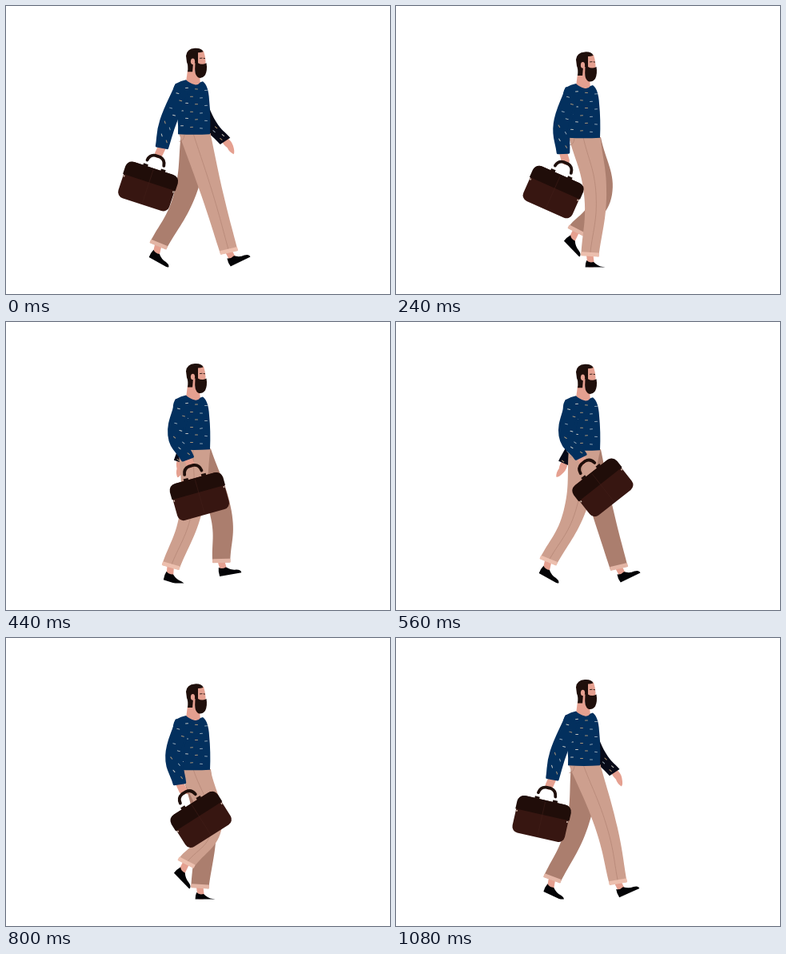
Animation, 480 px wide and 360 px high, one loop 1120 ms. Source, as an HTML page:

```html
<!DOCTYPE html>
<html lang="en">
<head>
<meta charset="utf-8">
<title>Walking man</title>
<style>
html, body { margin: 0; width: 100%; height: 100%; overflow: hidden; background: #fff; }
svg { display: block; width: 480px; height: 360px; }
</style>
</head>
<body>
<svg id="stage" viewBox="0 0 480 360"></svg>
<script>
const LOOP = 1120, HALF = LOOP / 2, STEP = 40, LAG = 120;
const SKIN = '#e5a090', NAVY = '#03305e', HAIR = '#1f0f0b', BLACK = '#030306', SEAM = '#b58776';
const { PI, sin, cos, atan2 } = Math;
const stage = document.getElementById('stage');

function el(parent, tag, attrs = {}) {
  const node = document.createElementNS('http://www.w3.org/2000/svg', tag);
  set(node, attrs);
  return parent.appendChild(node);
}
function set(node, attrs) {
  for (const key in attrs) node.setAttribute(key, attrs[key]);
}
const shape = (parent, d, fill) => el(parent, 'path', { d, fill });
const line = (parent, stroke, width, d = '') =>
  el(parent, 'path', { d, fill: 'none', stroke, 'stroke-width': width, 'stroke-linecap': 'round' });
const place = (node, p, angle = 0) =>
  set(node, { transform: `translate(${xy(p)}) rotate(${angle.toFixed(2)})` });
const xy = p => p[0].toFixed(2) + ',' + p[1].toFixed(2);
const mix = (a, b, k) => a + (b - a) * k;
const lerp = (a, b, k) => [mix(a[0], b[0], k), mix(a[1], b[1], k)];
const deg = a => a * 180 / PI;
const wave = (time, turns = 1) => cos(2 * PI * turns * time / LOOP);

// Limbs are two smooth edges running from the top over the joint to the end.
const endTilt = (mid, end) => 0.8 * atan2(mid[0] - end[0], end[1] - mid[1]);

function curve(top, mid, end) {
  const dx = (end[0] - top[0]) * 0.22, dy = (end[1] - top[1]) * 0.22;
  return [lerp(top, mid, 0.4), [mid[0] - dx, mid[1] - dy], mid,
    [mid[0] + dx, mid[1] + dy], lerp(end, mid, 0.4), end];
}
function limb(left, right, mid, midHalf, end, endHalf) {
  const a = endTilt(mid, end), c = cos(a) * endHalf, s = sin(a) * endHalf;
  const back = curve(left, [mid[0] - midHalf, mid[1]], [end[0] - c, end[1] - s]);
  const front = curve(right, [mid[0] + midHalf, mid[1]], [end[0] + c, end[1] + s]).reverse();
  return `M${xy(left)} C${back.map(xy).join(' ')} L${xy(front[0])} C`
    + [...front.slice(1), right].map(xy).join(' ') + 'Z';
}

function makeDashes(parent, count) {
  const tints = ['#e6e2d6', '#c9a77b', '#a9b8c4'];
  return Array.from({ length: count }, (_, i) => el(parent, 'rect',
    { x: -2, y: -0.5, width: 4, height: 1, rx: 0.5, opacity: 0.85, fill: tints[i % 3] }));
}

// The foot slides back over the ground in the first half of the cycle, then swings forward.
function gait(time) {
  const t = time % LOOP, u = t % HALF / HALF;
  if (t < HALF) return {
    x: mix(279, 190, u - 0.04 * sin(2 * PI * u)),
    y: mix(308, 300, u) + 8 * sin(PI * u),
    bend: 11 * (1 - (1 - u) ** 4),
    angle: 29 * u * u - 26 * (1 - u) ** 8
  };
  const ease = (1 - cos(PI * u)) / 2, lift = sin(PI * u ** 0.8) ** 2;
  return {
    x: mix(190, 279, ease),
    y: mix(300, 308, u) - 21 * lift,
    bend: 11 * (1 - u) + 20 * sin(PI * u),
    angle: mix(29, -26, ease) + 38 * lift
  };
}

const ground = el(stage, 'clipPath', { id: 'ground' });
el(ground, 'rect', { width: 480, height: 326.6 });

function makeLeg(color, cuffColor, seamColor) {
  const g = el(stage, 'g', { 'clip-path': 'url(#ground)' });
  const ankle = line(g, SKIN, 8.5);
  const shoe = shape(g, 'M0,-1 Q4,2 9,0 Q15,5 21,5 Q27.5,6 27,10 L-0.5,10 Q-1.5,4 0,-1Z', BLACK);
  const cloth = shape(g, '', color);
  const seam = line(g, seamColor, 0.8);
  const cuff = el(g, 'rect', { x: -11.3, y: -4.5, width: 22.6, height: 5, rx: 1, fill: cuffColor });
  return (time, bob, left, right) => {
    const { x, y, bend, angle } = gait(time);
    const top = 159 + bob, hip = [234, top], end = [x, y];
    const knee = [mix(236, x, 0.51) + bend, 236];
    const heel = [x - 4 - 0.07 * angle, y + 7 - 0.05 * angle];
    const r = angle * PI / 180;
    const instep = [heel[0] + 6 * cos(r) - 4 * sin(r), heel[1] + 6 * sin(r) + 4 * cos(r)];
    set(cloth, { d: limb([left, top], [right, top], knee, 14, end, 11) });
    set(seam, { d: `M${xy(hip)} C${curve(hip, [knee[0] + 1, 236], end).map(xy).join(' ')}` });
    set(ankle, { d: `M${xy(end)} L${xy(instep)}` });
    place(cuff, end, deg(endTilt(knee, end)));
    place(shoe, heel, angle);
  };
}

// Far arm
const farHand = shape(stage, 'M-2,-4 Q5,-6 11,-3 Q19,1 19,4 Q13,6 8,4 Q1,5 -2,3Z', SKIN);
const farSleeve = el(stage, 'path', { fill: '#080a18' });
const farDashes = makeDashes(stage, 5);

const farLeg = makeLeg('#ab7e6e', '#e3b5a5', 'none');
const nearLeg = makeLeg('#cd9f8e', '#ecbfae', SEAM);

// Torso and head
const body = el(stage, 'g');
line(body, SEAM, 0.8, 'M217,169 Q222,169 223,161');
shape(body, 'M227,80 L242,84 L243,99 L234,102 L225,95Z', SKIN);
shape(body, 'M225,92 Q219,93 212,97 Q206,104 211,125 Q216,140 215,159.8 Q235,161 255,159.8'
  + ' Q256,137 254,117 Q253,99 246,94 L243,95 Q240,99 236,98 Q229,96 225,92Z', NAVY);
makeDashes(body, 18).forEach((dash, i) => {
  const row = Math.floor(i / 3), col = i % 3;
  place(dash, [224 + col * 12 + (row % 2 ? -4 : 2), 102 + row * 9.5 + col * 1.5], (i * 7) % 11 - 5);
});
shape(body, 'M236,56 L247,56 Q249,62 249.5,69 L249,76 L236,80Z', SKIN);
shape(body, 'M225,62 Q226,53 236,52.5 Q245,52 246.5,57 Q243,58 240,58 L240,71 Q245,74 250.5,71'
  + ' Q252,80 249,86 Q245,91 240,89 Q236,86 236,78 L234,82 L227,82 Q228,74 226,70 Z', HAIR);
el(body, 'ellipse', { cx: 233.5, cy: 69, rx: 2.6, ry: 3.8, fill: SKIN });
shape(body, 'M234,71 L236.5,71 L236,83 L233,83Z', SKIN);
line(body, HAIR, 0.9, 'M242.5,65 L245,64.8 M247,65 L248.5,65.2');

// Near hand, bag and sleeve
const hand = line(stage, SKIN, 10);
const bag = el(stage, 'g');
line(bag, HAIR, 3.8, 'M-11,9 Q-10,1.5 -3,0.5 L3,0.5 Q10,1.5 11,9.5');
shape(bag, 'M-14,18 v-4 h6 v4Z M9,18 v-4 h6 v4Z', HAIR);
el(bag, 'rect', { x: -33.5, y: 16.5, width: 67, height: 47.5, rx: 8, fill: '#371611' });
shape(bag, 'M-34.5,35 V25 Q-33.5,16.5 -25,16.5 H25 Q33.5,16.5 34.5,25 V35Z', '#200d09');
line(bag, '#43201a', 0.5, 'M0,19 V62');
shape(bag, 'M-33,36 h1.5 v2 h-1.5Z M31.5,36 h1.5 v2 h-1.5Z', '#d9c3b5');
const sleeve = el(stage, 'path',
  { fill: NAVY, stroke: NAVY, 'stroke-width': 3, 'stroke-linejoin': 'round' });
const sleeveDashes = makeDashes(stage, 8);

function drawFarArm(time, bob) {
  const swing = wave(time);
  const root = [236, 110 + bob];
  const wrist = [242 + 32 * swing, 172.5 + bob - 4 * swing];
  const elbow = lerp(root, wrist, 0.5);
  elbow[0] -= 3 * swing;
  elbow[1] += 5;
  set(farSleeve, { d: limb([227, root[1]], [247, root[1]], elbow, 10.5, wrist, 7.5) });
  place(farHand, wrist, 77 - 40 * wave(time - LAG));
  farDashes.forEach((dash, i) => {
    const p = lerp(elbow, wrist, 0.1 + i * 0.2);
    place(dash, [p[0] + (i % 2 ? 4 : -3), p[1]], 40);
  });
}

function drawNearArm(time, bob) {
  const swing = wave(time), twice = wave(time, 2);
  const shoulder = [221, 103 + bob];
  const elbow = [209 - 5.5 * swing, 142 + bob];
  const wrist = [213 - 18 * swing, 175 + bob + 4 * swing - 3 * twice];
  const grip = [214.8 - 22 * swing - 3 * twice, 185.5 + bob + 6 * swing - 4.5 * twice];
  set(sleeve, { d: limb([213, 98 + bob], [229, 108 + bob], elbow, 9.5, wrist, 6.8) });
  sleeveDashes.forEach((dash, i) => {
    const k = 0.15 + i * 0.235;
    const p = k < 1 ? lerp(shoulder, elbow, k) : lerp(elbow, wrist, k - 1);
    place(dash, [p[0] + (i % 2 ? 4 : -4), p[1]], k < 1 ? 15 : deg(endTilt(elbow, wrist)) + 60);
  });
  set(hand, { d: `M${xy(wrist)} L${xy(lerp(wrist, grip, 0.8))}` });
  place(bag, grip, 36 * wave(time - LAG) - 7 - 3 * twice);
}

function draw(time) {
  const bob = 2.2 + 3 * wave(time - 200, 2);
  set(body, { transform: `translate(0,${bob.toFixed(2)})` });
  drawFarArm(time, bob);
  farLeg(time + HALF, bob, 219, 256);
  nearLeg(time, bob, 216, 255.5);
  drawNearArm(time, bob);
}

const start = performance.now();
function tick() {
  const elapsed = (performance.now() - start) % LOOP;
  draw(Math.floor(elapsed / STEP) * STEP);
  requestAnimationFrame(tick);
}
tick();
</script>
</body>
</html>
```
